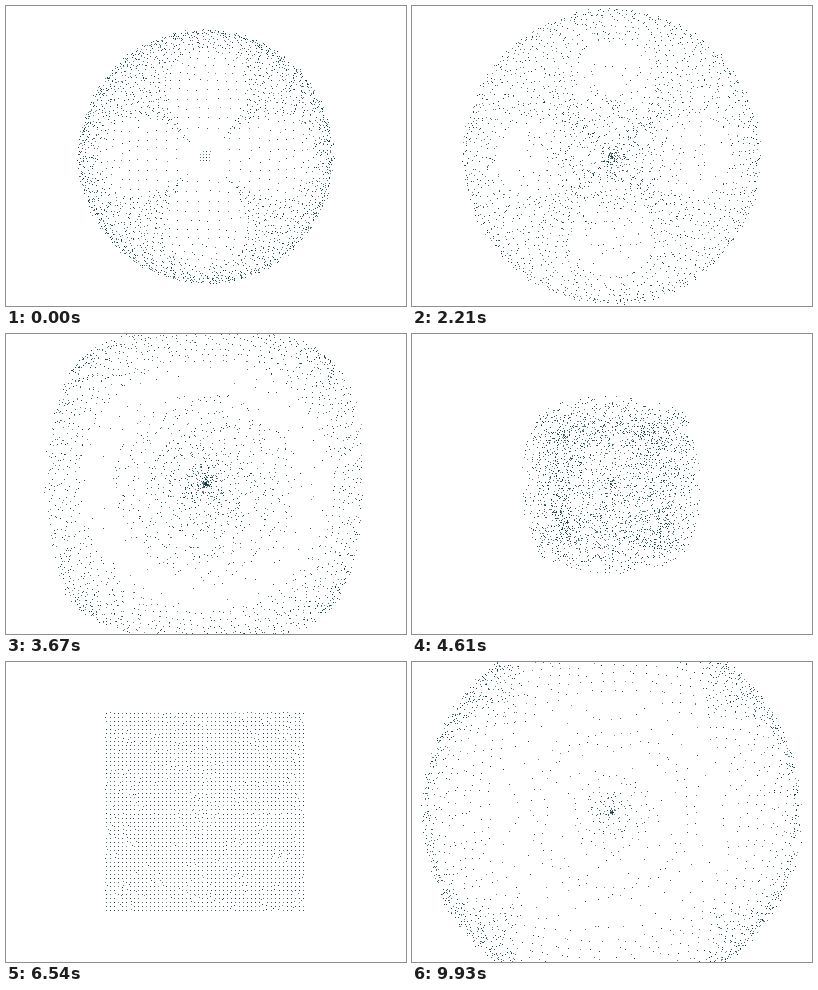
These frames come from a looping animation (400 by 300 pixels, 9990 ms). An HTML page with a canvas:

```html
<!DOCTYPE html>
<html lang="en">
<head>
<meta charset="utf-8">
<title>Particle grid</title>
<style>
html, body { margin: 0; width: 100%; height: 100%; overflow: hidden; background: #fff; }
canvas { display: block; width: 400px; height: 300px; }
</style>
</head>
<body>
<canvas id="stage" width="400" height="300"></canvas>
<script>
const ctx = document.getElementById('stage').getContext('2d');
const LOOP = 9990, RATE = 15;
const COUNT = 50, STEP = 4.04, CORNER = 141;
const CENTER = { x: 200, y: 150.8 };
const PERIOD = 2.4, RELEASE = 3.75, REST = 7, BURST = 9.03;

let seed = 71;
function random() {
  seed = (seed * 16807) % 2147483647;
  return seed / 2147483647;
}

const clamp = v => Math.max(0, Math.min(1, v));
const ease = v => { v = clamp(v); return v * v * (3 - 2 * v); };
const mix = (a, b, u) => a + (b - a) * u;

const dots = [];
for (let i = 0; i < COUNT * COUNT; i++) {
  const x = 100 + (i % COUNT) * STEP - CENTER.x;
  const y = 51 + Math.floor(i / COUNT) * STEP - CENTER.y;
  dots.push({
    home: Math.hypot(x, y),
    angle: Math.atan2(y, x),
    spread: random() + random() - 1,
    phase: random() * Math.PI * 2,
    delay: random(),
    alpha: 0.55 + random() * 0.45
  });
}

// The outer shell breathes; the scrambled core grows with the age of the burst.
function waveAt(t) {
  const bursting = t > REST;
  const swing = 0.5 - 0.5 * Math.cos(2 * Math.PI * t / PERIOD);
  const age = bursting ? t - BURST : t;
  return {
    reach: bursting ? 187 : mix(126 + 8 * t, 205 - 8 * t, swing),
    fold: bursting ? 95 : mix(75 - 4 * t, CORNER, swing),
    core: 75 * (1 - Math.exp(-age / 1.5)),
    age
  };
}

function waveRadius({ home, spread }, { reach, fold, core, age }) {
  const shell = reach * Math.sin(Math.PI / 2 * home / fold) * (1 + 0.025 * spread);
  const inner = 1.75 * home * Math.sin(home * 0.3 - age * 9 + 0.35 * spread);
  const r = mix(inner, shell, ease((home - core + 10) / 20));
  return home < 9 ? r * 0.3 : r;
}

// Dots gather in a loose disc, then each finds its own way home.
function settleRadius({ home, delay, phase }, t) {
  const left = 1 - ease((t - 4.7 - 0.8 * delay) / 1.3);
  const disc = 95 * Math.tanh(home / 95);
  return mix(home, disc, left) + 16 * left * Math.sin(phase + 6 * t);
}

function draw(t) {
  const wave = waveAt(t);
  const force = t < REST ? 1 - ease((t - RELEASE) / 0.6) : ease((t - BURST) / 0.5);
  ctx.globalAlpha = 1;
  ctx.fillStyle = '#fff';
  ctx.fillRect(0, 0, 400, 300);
  ctx.fillStyle = '#0c3a3a';
  for (const dot of dots) {
    const rest = t < REST ? settleRadius(dot, t) : dot.home;
    const r = mix(rest, waveRadius(dot, wave), force);
    const angle = dot.angle + 0.06 * dot.spread * force;
    ctx.globalAlpha = dot.alpha;
    ctx.fillRect(
      Math.floor(CENTER.x + r * Math.cos(angle)),
      Math.floor(CENTER.y + r * Math.sin(angle)),
      1, 1
    );
  }
}

function tick() {
  const ms = performance.now() % LOOP;
  draw(Math.floor((ms + 5) * RATE / 1000) / RATE);
  requestAnimationFrame(tick);
}
tick();
</script>
</body>
</html>
```
